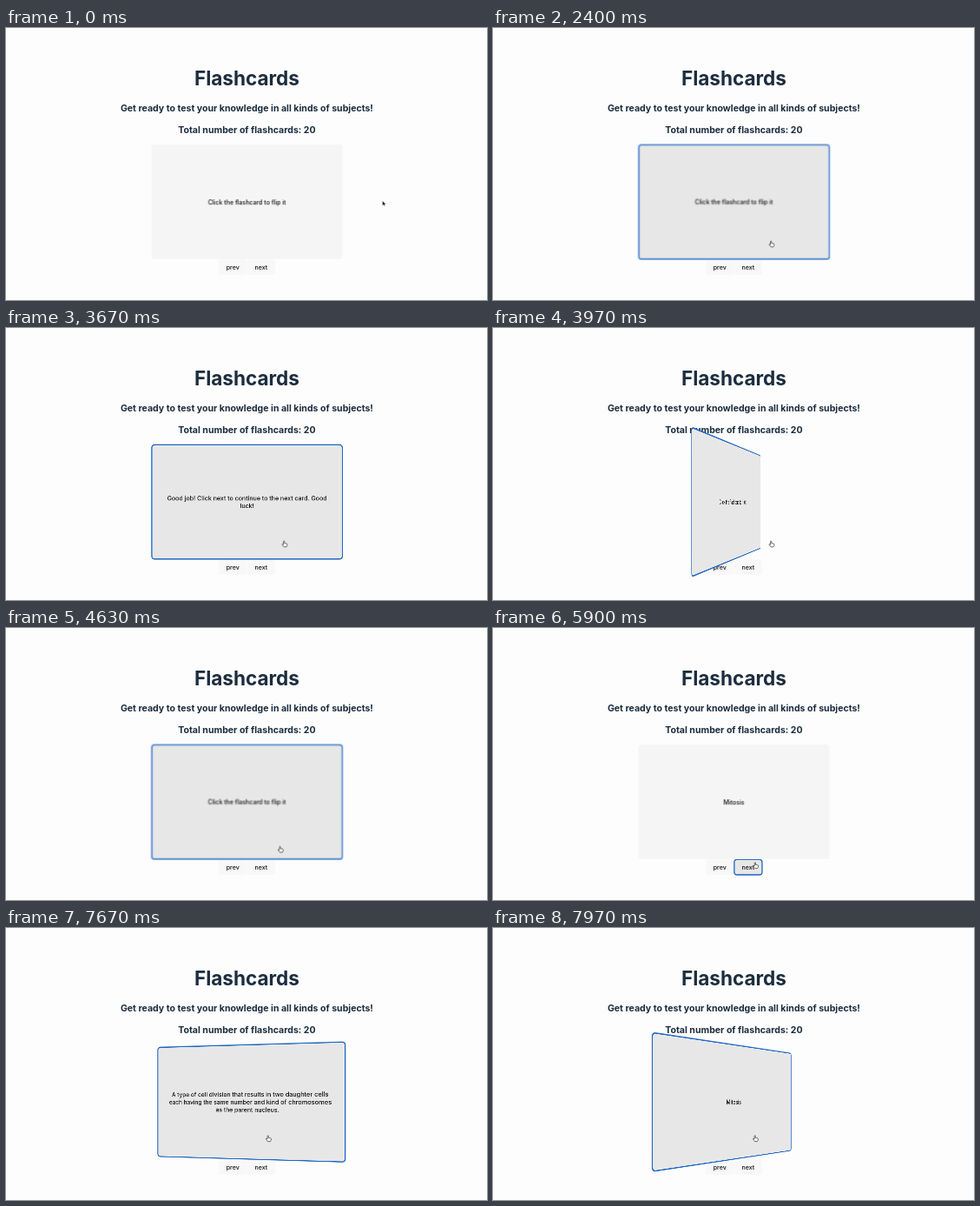
Write an HTML page that moves like this. It is 554 px wide and 313 px high and loops after 8 s.

```html
<!DOCTYPE html>
<html lang="en">
<head>
<meta charset="utf-8">
<title>Flashcards</title>
<style>
  html, body { margin: 0; width: 100%; height: 100%; overflow: hidden; background: #fdfdfd; }
  #app {
    position: absolute; left: 0; top: 0; width: 1261px; height: 712px; padding-top: 68px; box-sizing: border-box;
    transform: scale(.44); transform-origin: 0 0;
    font: 16px/1.5 Inter, sans-serif; color: #1c2d3e; text-align: center;
  }
  h1 { font-size: 51.2px; line-height: 1.1; margin: .67em 0; }
  h2 { font-size: 24px; margin: .83em 0; }
  .scene { width: 500px; height: 300px; margin: 0 auto; perspective: 1000px; }
  .card { position: relative; width: 100%; height: 100%; transform-style: preserve-3d; }
  .face, .button { font-weight: 500; line-height: normal; color: #111; border-radius: 8px; }
  .face {
    position: absolute; inset: 0; display: flex; align-items: center; justify-content: center;
    white-space: pre-line; backface-visibility: hidden;
  }
  #back { transform: rotateY(180deg); }
  .buttons { display: flex; justify-content: center; }
  .button { padding: .6em 1.2em; border: 1px solid transparent; background: #f8f8f8; }
  .focused { outline: 3px solid #1f66c4; outline-offset: -2px; }
  svg { position: absolute; left: 0; top: 0; }
</style>
</head>
<body>
<div id="app">
  <h1>Flashcards</h1>
  <h2>Get ready to test your knowledge in all kinds of subjects!</h2>
  <h2>Total number of flashcards: 20</h2>
  <div class="scene">
    <div class="card" id="card">
      <div class="face" id="front"></div>
      <div class="face" id="back"></div>
    </div>
  </div>
  <div class="buttons">
    <div class="button">prev</div>
    <div class="button" id="next">next</div>
  </div>
</div>
<svg width="554" height="313">
  <g id="cursor">
    <path id="arrow" d="M0 0V5.4L1.3 4.2L2.1 6.1L3 5.7L2.2 3.9H3.9Z" fill="#000" stroke="#fff" stroke-width=".4"/>
    <path id="hand" transform="translate(1 3.5)" fill="#fff" stroke="#333" stroke-width=".7" stroke-linejoin="round"
      d="M-1.4 .8V-2.8a.6.6 0 0 1 1.2 0V-.8L2.2-.4Q3-.2 2.9.8Q2.8 2.2 2 3.4H-1L-2.9.9Q-3.2 0-2.3.1Z"/>
  </g>
</svg>
<script>
const LOOP = 8000, FLIP = 800;
const $ = id => document.getElementById(id);
const clamp = v => Math.max(0, Math.min(1, v));
const within = (t, from, to) => t >= from && t < to;

const cards = [
  ['Click the flashcard to flip it',
   'Good job! Click next to continue to the next card. Good\nluck!'],
  ['Mitosis',
   'A type of cell division that results in two daughter cells\neach having the same number and kind of chromosomes\nas the parent nucleus.'],
];

// start time and direction of each half turn
const flips = [[2546, 1], [3688, -1], [6232, 1], [7610, -1]];

// time, x, y of the pointer tip
const pointer = [
  [0, 433.6, 199], [830, 433.6, 199], [1250, 340, 259], [1470, 333, 250], [2070, 333, 250],
  [2200, 320, 245], [4500, 320, 245], [4900, 301.7, 269.7], [5900, 301.7, 269.7],
  [6090, 301.5, 238.7], [LOOP, 301.5, 238.7],
];

// cubic-bezier(.25, .1, .25, 1)
function ease(x) {
  const bezier = (a, b, u) => 3 * (1 - u) ** 2 * u * a + 3 * (1 - u) * u * u * b + u ** 3;
  let low = 0, high = 1;
  for (let i = 0; i < 24; i++) {
    const mid = (low + high) / 2;
    if (bezier(.25, .25, mid) < x) low = mid; else high = mid;
  }
  return bezier(.1, 1, low);
}

function pointerAt(t) {
  const i = pointer.findIndex(p => p[0] > t);
  const [t0, x0, y0] = pointer[i - 1], [t1, x1, y1] = pointer[i];
  const k = (t - t0) / (t1 - t0), s = k * k * (3 - 2 * k);
  return [x0 + (x1 - x0) * s, y0 + (y1 - y0) * s];
}

const fade = (t, start) => clamp((t - start) / 130);
const gray = (from, to, k) => {
  const v = Math.round(from + (to - from) * k);
  return `rgb(${v},${v},${v})`;
};

let shownCard = -1;
function render(t) {
  const index = t < 5070 ? 0 : 1;
  if (index !== shownCard) {
    [$('front').textContent, $('back').textContent] = cards[index];
    shownCard = index;
  }

  const turn = flips.reduce((sum, [start, dir]) => sum + dir * ease(clamp((t - start) / FLIP)), 0);
  $('card').style.transform = `rotateY(${180 * turn}deg)`;

  const hover = fade(t, 2070) - fade(t, 4800) + fade(t, 5940);
  const cardFocused = within(t, 2400, 4990) || t >= 6100;
  for (const id of ['front', 'back']) {
    $(id).style.background = gray(245, 231, hover);
    $(id).classList.toggle('focused', cardFocused);
  }
  $('next').style.background = gray(248, 231, within(t, 4800, 5940) ? 1 : 0);
  $('next').classList.toggle('focused', within(t, 4990, 6100));

  $('cursor').setAttribute('transform', `translate(${pointerAt(t)})`);
  $('arrow').style.display = t < 2070 ? '' : 'none';
  $('hand').style.display = t < 2070 ? 'none' : '';
}

const began = performance.now();
function tick() {
  render((performance.now() - began) % LOOP);
  requestAnimationFrame(tick);
}
tick();
</script>
</body>
</html>
```
